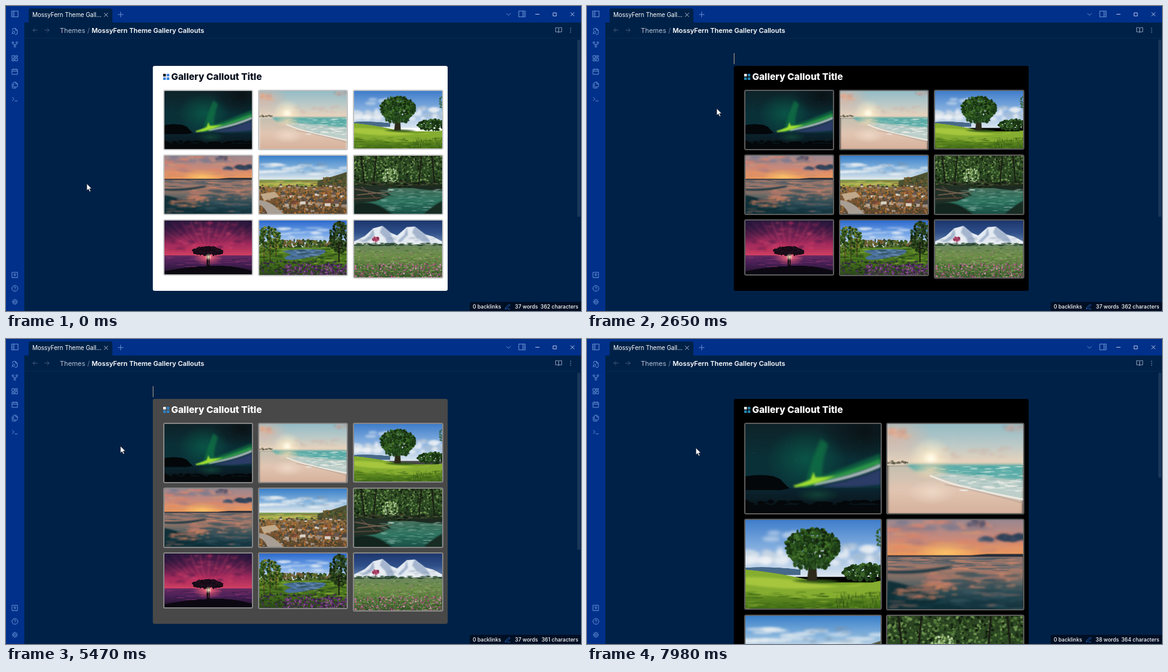
An HTML page with a canvas for the animation above (8000 ms loop, 940 by 499 pixels).

```html
<!DOCTYPE html>
<html lang="en">
<head>
<meta charset="utf-8">
<title>Gallery callouts</title>
<style>
html, body { margin: 0; width: 100%; height: 100%; overflow: hidden; background: #002147; }
#stage { position: relative; width: 940px; height: 499px; overflow: hidden; background: #002147; font-family: Inter, sans-serif; color: #fff; }
#stage > * { position: absolute; }
.bar { background: #00308a; }
.t { white-space: pre; line-height: 16px; }
#tab { left: 37px; top: 4px; width: 137px; height: 23px; background: #002147; border-radius: 4px 4px 0 0; }
#rule { left: 30px; top: 52px; width: 910px; height: 1px; background: #06294f; }
#scroll { left: 934px; top: 55px; width: 5px; border-radius: 2px; background: #1a3759; }
#status { left: 758px; top: 484px; width: 182px; height: 15px; background: #000f24; border-radius: 4px 0 0 0; }
.s { font-size: 8.5px; font-weight: 500; top: 484px; }
#gallery { left: 240px; top: 98px; width: 482px; min-height: 368px; border-radius: 3px; background: var(--bg); color: var(--fg); }
#gallery.hover { box-shadow: 0 0 0 1px #1a3759; }
#gallery h1 { position: absolute; left: 30px; top: 8px; margin: 0; font-size: 15.2px; line-height: 20px; font-weight: 800; white-space: pre; }
#mark { position: absolute; left: 17px; top: 13px; width: 10px; height: 10px; }
#grid { display: grid; margin: 39px 0 0 16.5px; width: 458px; gap: 7.1px; align-items: start; }
#grid canvas { display: block; box-sizing: border-box; width: 100%; border: 2px solid var(--edge); border-radius: 3px; }
#source { left: 240px; top: 98px; width: 482px; height: 227.5px; background: #1b3859; font-size: 15.2px; line-height: 22.75px; color: #cc70f0; white-space: pre; }
#source::before { content: ""; position: absolute; left: 0; top: 0; width: 3px; height: 100%; background: #007fff; }
#source div { padding-left: 16.5px; }
#source b { font-weight: 700; }
#gt { position: absolute; left: 3px; font-weight: 600; }
#title { color: #e8edf5; }
#caret { position: relative; }
#caret::after { content: ""; position: absolute; left: -.5px; top: 1px; width: 1px; height: 17px; background: #e3dcc8; }
#topcaret { left: 240px; top: 77px; width: 1px; height: 18px; background: #a8a08c; }
svg { left: 0; top: 0; }
</style>
</head>
<body>
<div id="stage">
  <div class="bar" style="left:0;top:0;width:940px;height:27px"></div>
  <div class="bar" style="left:0;top:0;width:30px;height:499px"></div>
  <div id="tab"></div>
  <div id="rule"></div>
  <div class="t" style="left:43px;top:6.5px;font-size:9.65px">MossyFern Theme Gall...</div>
  <div class="t" style="left:88px;top:31.5px;font-size:10.9px;color:#b4c0d2">Themes</div>
  <div class="t" style="left:133px;top:31.5px;font-size:10.9px;color:#6f83a0">/</div>
  <div class="t" style="left:140px;top:31.5px;font-size:10.9px;font-weight:600">MossyFern Theme Gallery Callouts</div>
  <div id="gallery">
    <svg id="mark" viewBox="0 0 10 10"></svg>
    <h1>Gallery Callout Title</h1>
    <div id="grid"></div>
  </div>
  <div id="source"></div>
  <div id="topcaret"></div>
  <div id="scroll"></div>
  <div id="status"></div>
  <div class="t s" style="left:763px">0 backlinks</div>
  <div class="t s" id="words" style="right:70.5px"></div>
  <div class="t s" id="chars" style="right:4.5px"></div>
  <svg id="icons" width="940" height="499" fill="none" stroke-linecap="round" stroke-linejoin="round"></svg>
  <svg id="arrow" width="12" height="18" viewBox="-1 -1 12 18"><path d="M0 0V11.6L2.7 9.2L4.6 13.4L6.6 12.5L4.7 8.4H8.3Z" fill="#fff" stroke="#0a1424" stroke-width=".8"/></svg>
</div>
<script>
const $ = id => document.getElementById(id);

// Window icons on a 24-unit box: x, y, scale, colour, path
const ring = (x, y, r) => `M${x - r} ${y}a${r} ${r} 0 1 0 ${2 * r} 0a${r} ${r} 0 1 0 ${-2 * r} 0`;
const box = (x, y, w, h) => `M${x} ${y}h${w}v${h}h${-w}z`;
const side = '#6d93d6', dim = '#47607f', soft = '#8fa3bf', pale = '#c3d2ee';
const icons = [
  [14.5, 13, .52, side, box(2, 3, 20, 18) + 'M9 3v18M5 8h1M5 12h1M5 16h1'],
  [14.5, 41.5, .48, side, 'M4 8V4a2 2 0 0 1 2-2h8l6 6v12a2 2 0 0 1-2 2h-5M14 2v6h6M2 21l3-3' + ring(7.5, 15.5, 4)],
  [14.5, 63, .46, side, ring(12, 19, 3) + ring(5, 5, 3) + ring(19, 5, 3) + 'M5 8v2a2 2 0 0 0 2 2h10a2 2 0 0 0 2-2V8M12 12v4'],
  [14.5, 85.5, .48, side, box(3, 3, 7, 9) + box(14, 3, 7, 5) + box(14, 12, 7, 9) + box(3, 16, 7, 5)],
  [14.5, 107.5, .48, side, box(3, 4, 18, 17) + 'M3 10h18M8 2v4M16 2v4'],
  [14.5, 129.5, .48, side, 'M15 2H9a2 2 0 0 0-2 2v12a2 2 0 0 0 2 2h10a2 2 0 0 0 2-2V8zM15 2v6h6M3 7v13a2 2 0 0 0 2 2h11'],
  [14.5, 152, .46, side, 'M3 18l6-6-6-6M12 19h9'],
  [14.5, 440, .48, side, box(3, 3, 18, 18) + ring(12, 10.5, 3) + 'M12 14v2M7 21v1M17 21v1'],
  [14.5, 462, .48, side, ring(12, 12, 10) + 'M9 9a3 3 0 0 1 6 1c0 2-3 3-3 3M12 17v.1'],
  [14.5, 484, .42, side, ring(12, 12, 3.5) + ring(12, 12, 8) + 'M12 1v3M12 20v3M1 12h3M20 12h3M4 4l2 2M18 18l2 2M4 20l2-2M18 6l2-2'],
  [163.5, 14.5, .46, pale, 'M6 6l12 12M18 6L6 18'],
  [187.5, 14, .46, side, 'M12 3v18M3 12h18'],
  [821.5, 13.5, .46, side, 'M5 9l7 7 7-7'],
  [843.5, 13, .52, side, box(2, 3, 20, 18) + 'M15 3v18M18 8h1M18 12h1M18 16h1'],
  [868.5, 13.5, .46, pale, 'M6 12h13'],
  [897, 13.5, .46, pale, box(7, 7, 11, 11)],
  [926, 13.5, .46, pale, 'M6 6l12 12M18 6L6 18'],
  [47.5, 39.5, .44, dim, 'M20 12H4M11 5l-7 7 7 7'],
  [67, 39.5, .44, dim, 'M4 12h16M13 5l7 7-7 7'],
  [903.5, 39.5, .46, soft, 'M2 3h6a4 4 0 0 1 4 4v14a3 3 0 0 0-3-3H2zM22 3h-6a4 4 0 0 0-4 4v14a3 3 0 0 1 3-3h7z'],
  [923, 39.5, .46, soft, ring(12, 5, .8) + ring(12, 12, .8) + ring(12, 19, .8)],
  [820, 492, .38, '#2f7bf0', 'M17 3a2.8 2.8 0 1 1 4 4L7.5 20.5 2 22l1.5-5.5zM13 22h9']
];
$('icons').innerHTML = icons.map(([x, y, k, c, d]) =>
  `<path transform="translate(${x} ${y}) scale(${k}) translate(-12 -12)" stroke="${c}" stroke-width="2" d="${d}"/>`).join('');

// Source view
const pasted = s => 'Pasted image 20240207' + s;
const files = ['photo-3451755 1.webp', pasted('123233.png'), pasted('125535.jpg'), 'photo-262325.webp',
  ...['125702', '125953', '125900', '130054', '130203'].map(s => pasted(s + '.jpg'))];
$('source').innerHTML = '<span id="gt">&gt;</span><div><b>[!g-<span id="tag"></span><span id="caret"></span>]</b> <span id="title">Gallery Callout Title</span></div>' +
  files.map(f => `<div>${f}</div>`).join('');
$('mark').innerHTML = `<path d="${box(0, 0, 4.3, 4.3)}" fill="var(--fg)"/><path d="${box(5.7, 0, 4.3, 4.3) + box(0, 5.7, 4.3, 4.3) + box(5.7, 5.7, 4.3, 4.3)}" fill="var(--dot)"/>`;

// Photos, painted on a sheet 147 units wide
function brush(g, seed) {
  const rnd = () => {
    seed = seed + 0x6D2B79F5 | 0;
    let t = Math.imul(seed ^ seed >>> 15, 1 | seed);
    t = t + Math.imul(t ^ t >>> 7, 61 | t) ^ t;
    return ((t ^ t >>> 14) >>> 0) / 4294967296;
  };
  const dot = (c, x, y, rx, ry = rx) => {
    g.fillStyle = c;
    g.beginPath();
    g.ellipse(x, y, rx, ry, 0, 0, 7);
    g.fill();
  };
  const pick = list => list[rnd() * list.length | 0];
  const size = () => .5 + rnd();
  return {
    dot,
    blur(px) { g.filter = px ? `blur(${px}px)` : 'none'; },
    fade(y, h, ...cols) {
      const f = g.createLinearGradient(0, y, 0, y + h);
      cols.forEach((c, i) => f.addColorStop(i / (cols.length - 1), c));
      g.fillStyle = f;
      g.fillRect(0, y, 147, h);
    },
    glow(c, x, y, r, k = 1) {
      g.save();
      g.translate(x, y);
      g.scale(1, k);
      const f = g.createRadialGradient(0, 0, 0, 0, 0, r);
      f.addColorStop(0, c);
      f.addColorStop(1, c.slice(0, 7) + '00');
      g.fillStyle = f;
      g.fillRect(-r, -r, 2 * r, 2 * r);
      g.restore();
    },
    shape(c, d) { g.fillStyle = c; g.fill(new Path2D(d)); },
    line(c, w, d) { g.strokeStyle = c; g.lineWidth = w; g.stroke(new Path2D(d)); },
    strew(n, cols, x, y, w, h, rx, ry = rx) {
      while (n--) dot(pick(cols), x + rnd() * w, y + rnd() * h, rx * size(), ry * size());
    },
    tuft(n, cols, x, y, w, h, rx, ry = rx) {
      while (n--) {
        const a = rnd() * 6.283, k = Math.sqrt(rnd());
        dot(pick(cols), x + Math.cos(a) * k * w, y + Math.sin(a) * k * h, rx * size(), ry * size());
      }
    }
  };
}

const photos = [
  [97.3, p => { // aurora
    p.fade(0, 72, '#0e2329', '#0a3037', '#0b3039');
    p.glow('#0b5c4ad0', 66, 38, 44, .8);
    p.glow('#0a1216f0', 130, 8, 48, .7);
    p.strew(30, ['#5f8f8c90'], 0, 2, 147, 40, .25);
    p.blur(5);
    p.shape('#127a45a0', 'M66 62Q72 38 82 16L90 22Q82 44 84 56Q112 46 147 32V44Q104 56 60 66Z');
    p.shape('#2f9c48', 'M58 66Q104 55 147 38V43Q106 60 64 68Z');
    p.blur(3);
    p.shape('#b2bcc0', 'M76 64Q118 56 147 43V47Q118 60 74 67Z');
    p.shape('#2b3c66', 'M84 67Q122 60 147 49V66Q110 70 84 68Z');
    p.shape('#a3e032', 'M52 67Q66 63 71 60L74 52 76 58Q88 58 98 56Q78 66 54 69Z');
    p.blur(0);
    p.fade(70, 28, '#0b2530', '#0a1a22', '#05080c');
    p.glow('#14503cb0', 78, 77, 24, .35);
    p.shape('#03070a', 'M0 57Q16 54 31 57L38 60Q42 65 48 70L38 72H0Z');
    p.strew(30, ['#04080a'], 0, 84, 147, 5, 6, 1.5);
    p.fade(88, 10, '#04080a', '#04080a');
  }],
  [97.3, p => { // beach
    p.fade(0, 45, '#94bcc6', '#bccac8', '#f0d4ba');
    p.blur(4);
    p.glow('#e0b4a0c0', 8, 14, 40, .7);
    p.tuft(20, ['#d99c84b0', '#e8b497b0'], 13, 10, 14, 6, 3, 1.5);
    p.tuft(14, ['#909194a0', '#c7aaa3a0'], 136, 4, 12, 4, 3, 1.5);
    p.strew(16, ['#d0aca090'], 40, 26, 95, 10, 4, 1);
    p.glow('#fff0cc', 47, 38, 24);
    p.glow('#fffdf0', 47, 38, 9);
    p.fade(44, 55, '#c2bfb0', '#e2c5b2', '#d4b09a');
    p.shape('#5fafaa', 'M20 44H147V63Q100 58 30 51Z');
    p.shape('#bccfca', 'M30 51Q90 56 147 62V83Q110 76 90 70T46 55Z');
    p.blur(1);
    p.strew(70, ['#e8f0e8b0', '#47a09fa0'], 50, 46, 97, 12, 5, .4);
    p.strew(60, ['#f0f0eab0', '#9cbcb8a0'], 78, 60, 69, 13, 5, .7);
    p.glow('#f6d8b0d0', 47, 50, 22, .5);
    p.line('#f2eee6', 1.8, 'M46 56Q64 64 85 69T147 82');
    p.line('#b59a8cc0', 1, 'M62 66Q90 70 147 86');
    p.glow('#f0dccad0', 48, 74, 28, .5);
    p.tuft(22, ['#5a5848', '#7a7060'], 10, 42, 13, 1.6, 1.5, .8);
  }],
  [96.5, p => { // oak
    p.fade(0, 62, '#3f7dcb', '#86b0e0', '#dce6ef');
    p.blur(6);
    p.tuft(26, ['#eef2f6d0', '#c8d6e4c0'], 18, 41, 32, 8, 7, 3);
    p.tuft(24, ['#eef2f6d0', '#a9bed4c0'], 112, 38, 36, 10, 6, 3);
    p.tuft(12, ['#d8e4f0a0'], 40, 22, 44, 8, 7, 2);
    p.blur(0);
    p.shape('#47698a', 'M0 52Q24 50 60 54V60H0Z');
    p.tuft(170, ['#16300f', '#26481e', '#3a6428', '#1b3914'], 131, 57, 24, 9, 1.9);
    p.fade(68, 30, '#7ba52a', '#648f22', '#3a6614');
    p.shape('#85ad30', 'M0 54Q35 57 72 66T147 66V82Q60 90 0 78Z');
    p.blur(3);
    p.shape('#a6c63e', 'M0 62Q40 62 78 69T130 69Q60 80 0 70Z');
    p.shape('#345a17', 'M50 66Q78 63 104 67Q78 71 50 66Z');
    p.blur(1);
    p.strew(130, ['#33581590', '#5a842090', '#86a93490'], 0, 78, 147, 20, 5, .6);
    p.strew(140, ['#2f5214', '#456d1d', '#5f8428'], 98, 80, 49, 20, .3, 2.5);
    p.shape('#2c2a1a', 'M69 48H77L78 66H67Z');
    p.tuft(520, ['#14290f', '#21441a', '#2e581e', '#1b3813', '#42702a'], 73, 29, 29, 20, 2);
    p.tuft(60, ['#1d3d18', '#2c5424'], 73, 48, 20, 6, 1.8);
    p.tuft(26, ['#335b2a'], 146, 20, 4, 10, 1);
  }],
  [97.3, p => { // dusk sea
    p.fade(0, 40, '#9a8890', '#c88a7c', '#f39a58');
    p.blur(4);
    p.strew(24, ['#e27e62b0', '#e89272a0', '#7a7a90b0'], 0, 2, 110, 9, 9, 1.8);
    p.strew(44, ['#e8805eb0', '#f0a268a0', '#a87a80a0'], 0, 12, 147, 22, 10, .9);
    p.glow('#ffc468', 64, 36, 36, .35);
    p.tuft(24, ['#3b4b62', '#2e4158'], 135, 19, 13, 2.5, 4, 1.8);
    p.tuft(12, ['#3f5068', '#596479'], 105, 21, 9, 1.4, 3, 1.2);
    p.tuft(12, ['#5a566c'], 97, 4, 10, 3, 3, 1.5);
    p.blur(1);
    p.fade(39, 60, '#86706c', '#a87a6a', '#5c6464', '#20404a', '#12303a');
    p.shape('#252c38', 'M0 38.500H90L108 37H147V40H0Z');
    p.strew(80, ['#d48a6aa0', '#5a6872a0', '#385460a0'], 0, 41, 147, 14, 10, .6);
    p.blur(3);
    p.shape('#1c3a46', 'M0 55Q34 56 66 50Q78 49 60 54Q34 60 0 58Z');
    p.strew(40, ['#d68a6aa0', '#b87a6ca0'], 40, 58, 95, 14, 10, 1.4);
    p.strew(34, ['#375862b0', '#2a4a56b0'], 70, 58, 77, 40, 12, 1.8);
    p.shape('#103038', 'M0 66Q26 70 50 84T110 99H0Z');
    p.tuft(40, ['#d88460a0', '#b0705ca0'], 42, 78, 34, 8, 6, 1.2);
    p.strew(46, ['#214a54b0', '#143842b0', '#8a6860a0'], 0, 76, 147, 22, 9, 1);
  }],
  [97.3, p => { // village
    p.fade(0, 42, '#3a80ca', '#84b3dd', '#eef0ee');
    p.blur(4);
    p.strew(26, ['#f0f2f4b0'], 4, 14, 140, 18, 12, 1.4);
    p.strew(12, ['#7794b0b0'], 60, 13, 70, 15, 7, 1);
    p.blur(1);
    p.fade(40, 16, '#6f9650', '#b8b44e', '#7d8a3e');
    p.strew(30, ['#c8c060', '#5f9140', '#8f7640'], 0, 42, 110, 8, 9, .5);
    p.shape('#4c5132', 'M98 42Q120 36 147 27V54H98Z');
    p.strew(110, ['#39452c', '#7a5a2f', '#566035'], 108, 37, 39, 12, 1.5);
    p.fade(52, 46, '#8a6c44', '#785432', '#5c4630');
    p.strew(420, ['#a06630', '#b87a3c', '#55502f', '#84664a', '#3f4030', '#a09080'], 0, 49, 147, 50, 1.8, 1.3);
    p.shape('#a89e94', 'M0 74Q20 75 42 98H14Q10 86 0 82Z');
    p.shape('#c0a98a', 'M2 64L26 60 34 68 8 75Z');
    for (let i = 0; i < 24; i++) {
      const row = i >> 3, k = .5 + row * .3, x = 34 + i % 8 * 14 + row * 3, y = 50 + row * 13 + i * 7 % 6;
      const w = 9 * k, h = 6 * k;
      p.shape(['#d8d0c4', '#b8a898', '#9c8878'][i % 3], `M${x} ${y}h${w}v${h * .8}h${-w}z`);
      p.shape(['#5a5450', '#7d4a38', '#67544c', '#484644'][i % 4], `M${x - 1} ${y}l${w * .4} ${-h}h${w * .7}l${w * .1} ${h}z`);
    }
    p.strew(170, ['#a8662a', '#3c442a', '#c07c38', '#5c4a30'], 34, 56, 113, 42, 1.3);
  }],
  [97, p => { // forest river
    p.fade(0, 60, '#2c4222', '#2c4a24', '#1a281a');
    p.blur(1);
    p.strew(700, ['#121e0e', '#365a26', '#4f7538', '#1a2e16', '#6e9450', '#26401f'], 0, 0, 147, 48, 1.4);
    p.tuft(130, ['#a7c88a', '#82aa54', '#c7dcb0', '#4a7038'], 60, 33, 13, 13, 1.1);
    p.line('#1a1c14', 2, 'M12 0L18 52M37 0L32 50M112 0L108 52M130 0L135 54');
    p.strew(120, ['#121c14', '#393827', '#22311d', '#4a5038'], 0, 43, 147, 10, 4, 1);
    p.fade(54, 45, '#47705e', '#307662', '#174c42');
    p.shape('#223026', 'M0 50H58Q52 62 62 66L36 76 0 80Z');
    p.shape('#1c2a20', 'M147 50H86Q106 58 147 58Z');
    p.line('#5c4a3c', 1.6, 'M0 56L56 66M4 66L62 60M0 72L46 70M12 52L38 72');
    p.line('#94806e', .6, 'M2 55L54 65M6 65L58 60');
    p.strew(110, ['#5c9a86b0', '#a8c8bca0', '#1c5a4cb0'], 44, 56, 103, 36, 6, .5);
    p.dot('#d8e6e0', 62, 57, 5, .8);
    p.blur(3);
    p.shape('#12241d', 'M0 80Q30 73 54 91T104 99H0Z');
    p.shape('#182c24', 'M147 75Q128 86 116 98H147Z');
  }],
  [90.2, p => { // magenta dusk
    p.fade(0, 59, '#2e193f', '#64204f', '#a02a5c', '#d24062');
    p.blur(5);
    for (let i = 0; i < 13; i++) p.line('#e04a7470', 1.8, `M73 58Q${20 + i * 9} 34 ${-20 + i * 16} 2`);
    p.strew(70, ['#cc346080', '#45184aa0', '#8a2458a0', '#e8527480'], 10, 3, 127, 48, 6, 1.4);
    p.glow('#24163be0', 5, 5, 42, .8);
    p.glow('#24163be0', 142, 3, 38, .9);
    p.blur(0);
    p.fade(58, 28, '#682a62', '#482056', '#271633');
    p.strew(70, ['#9c3a7890', '#2c184390'], 0, 60, 147, 18, 8, .4);
    p.glow('#ff6478', 73, 60, 26, .6);
    p.shape('#0c0812', 'M0 85Q30 78 73 76T147 84V93H0Z');
    p.shape('#160a14', 'M48 55Q50 44 73 43Q96 44 99 55Q92 59 76 56V76H71V56Q56 59 48 55Z');
    p.tuft(160, ['#140a16', '#22101e', '#1a0e1b'], 73, 51, 25, 7, 1.5);
    p.glow('#fff0c8', 74, 61, 6);
    p.line('#ffb8a0', .8, 'M74 62V74');
  }],
  [91.1, p => { // garden lake
    p.fade(0, 45, '#2c6ace', '#74a6e8', '#edf2f4');
    p.blur(4);
    p.strew(14, ['#e4ecf6a0'], 20, 12, 90, 18, 11, 1.6);
    p.blur(1);
    p.tuft(260, ['#2c4a26', '#56702a', '#705a30', '#243a1e'], 72, 40, 66, 7, 2);
    p.fade(45, 48, '#5c8726', '#48721e', '#2a4718');
    p.strew(70, ['#7ca032', '#335c1a', '#26401a'], 0, 43, 147, 30, 6, .8);
    p.shape('#48709c', 'M38 51Q68 46 110 49Q116 55 92 60T52 66Q32 64 54 57Z');
    p.strew(60, ['#96b2cc90', '#2c486890', '#304a30a0'], 50, 49, 56, 13, 5, .5);
    p.tuft(330, ['#1a3a16', '#4c7022', '#7c862c', '#2c5018'], 15, 35, 23, 24, 1.7);
    p.line('#3b2c1c', 1, 'M18 16V66M28 24V62M8 22V70');
    p.tuft(360, ['#12200d', '#1f3416', '#2a451a', '#3c5824'], 136, 28, 18, 26, 1.7);
    p.line('#1c1912', 2, 'M134 35V70');
    p.strew(200, ['#1f3616', '#342444', '#46305a', '#2c4b1c'], 0, 68, 147, 25, 2.4, 1.3);
    p.strew(330, ['#763a86', '#56286a', '#9a549c', '#342046'], 42, 73, 105, 20, 1.1);
  }],
  [95.4, p => { // alpine meadow
    p.fade(0, 42, '#1d376f', '#30508a', '#7490b4');
    p.blur(1);
    p.shape('#e5ebf2', 'M0 35L18 26 32 13 47 9 60 20 72 25 88 11 101 10 118 23 132 27 147 35V44H0Z');
    p.blur(3);
    p.shape('#a4b5cd', 'M47 9L43 20 52 29 56 40 68 37 60 20ZM101 10L97 20 106 31 118 38 128 36 118 23ZM32 13L26 25 12 36 22 35 34 25ZM88 11L84 24 72 35 78 36 90 24Z');
    p.strew(40, ['#8193ae80', '#ffffffb0'], 8, 27, 130, 10, 4, .6);
    p.blur(1);
    p.fade(40, 57, '#6c8660', '#6c8e48', '#567a3c', '#385a2c');
    p.strew(70, ['#243f30', '#3a5a3c'], 0, 38, 147, 4, 4, .8);
    p.strew(300, ['#7e9e54', '#4c7036', '#8ea668'], 0, 46, 147, 50, 3, .5);
    p.line('#4b3028', .8, 'M36 32V40');
    p.tuft(80, ['#a83a62', '#c45c80', '#842c4c'], 36, 31, 5.5, 4, .9);
    p.strew(200, ['#bc6898', '#d69cba', '#a44a82'], 0, 52, 147, 28, .5);
    p.strew(420, ['#c85c98', '#dc9cc2', '#a4437a', '#35582b', '#2a4a24'], 0, 72, 147, 25, .95);
  }]
];
photos.forEach(([h, paint], i) => {
  const c = document.createElement('canvas');
  c.width = 441;
  c.height = h * 3;
  const g = c.getContext('2d');
  g.scale(3, 3);
  paint(brush(g, 11 + i * 37));
  $('grid').append(c);
});

const themes = {
  white: ['#ffffff', '#08101e', '#c4c4c4', '#3b82d6'],
  black: ['#000000', '#ffffff', '#5c5c5c', '#2583ae'],
  gray: ['#484848', '#ffffff', '#858585', '#3280c4']
};

// time, pointer x, pointer y, view ('>' marks the typed source), caret on
const steps = [
  [0, 132, 290.5, 'white', 0],
  [310, 172, 246, 'white', 0],
  [480, 222, 196, 'white', 0],
  [640, 252, 150, 'white hover', 0],
  [810, 262, 128, 'white hover', 0],
  [1310, 218, 166, '>b', 1],
  [1640, 217, 166, '>bl', 1],
  [1810, 216, 166.5, '>bla', 1],
  [1980, 215, 166.5, '>blac', 1],
  [2140, 214, 167, '>black', 1],
  [2310, 214, 167, '>black', 0],
  [2650, 212, 167.5, 'black', 1],
  [2820, 210, 168, 'black', 1],
  [2980, 209, 168.5, 'black', 1],
  [3150, 208, 169, 'black', 0],
  [3320, 206.5, 169, 'black', 0],
  [3480, 200, 171, '>gr', 1],
  [3650, 194, 172, '>gray', 1],
  [3980, 193, 173, '>gray', 1],
  [4150, 192.5, 173, '>gray', 0],
  [4480, 191, 173.5, 'gray', 1],
  [4640, 190, 174, 'gray', 1],
  [4810, 189, 174, 'gray', 1],
  [4980, 188.5, 174.5, 'gray', 0],
  [5140, 188, 175, 'gray', 0],
  [5310, 187.5, 175, 'gray', 0],
  [5470, 187, 175, 'gray', 1],
  [5800, 183, 176.5, '>b', 1],
  [5970, 179, 178, '>bla', 1],
  [6140, 178, 178, '>black', 1],
  [6640, 178, 178, '>black|', 1],
  [6820, 178, 178, '>black|2', 1],
  [6990, 178, 178, '>black|2', 0],
  [7980, 178, 178, 'black|2', 0]
];
const show = (id, on) => $(id).style.display = on ? '' : 'none';
let current = -1;

function render(i) {
  const [, x, y, view, caret] = steps[i];
  const editing = view[0] === '>';
  const [tag, hover] = view.replace('>', '').split(' ');
  const [theme, cols = 3] = tag.split('|');
  show('source', editing);
  show('gallery', !editing);
  show('topcaret', !editing && caret);
  show('caret', caret);
  if (editing) {
    $('tag').textContent = tag;
  } else {
    ['--bg', '--fg', '--edge', '--dot'].forEach((k, n) => $('gallery').style.setProperty(k, themes[theme][n]));
    $('gallery').className = hover || '';
    $('grid').style.gridTemplateColumns = `repeat(${cols}, 1fr)`;
  }
  $('scroll').style.height = (editing ? 366 : cols === '2' ? 172 : 290) + 'px';
  $('words').textContent = (tag.endsWith('2') ? 38 : 37) + ' words';
  $('chars').textContent = 357 + tag.length + ' characters';
  $('arrow').style.transform = `translate(${x - 1}px, ${y - 1}px)`;
}

function tick(now) {
  const t = now % 8000;
  const i = steps.findLastIndex(s => s[0] <= t);
  if (i !== current) render(current = i);
  requestAnimationFrame(tick);
}
requestAnimationFrame(tick);
render(current = 0);
</script>
</body>
</html>
```
